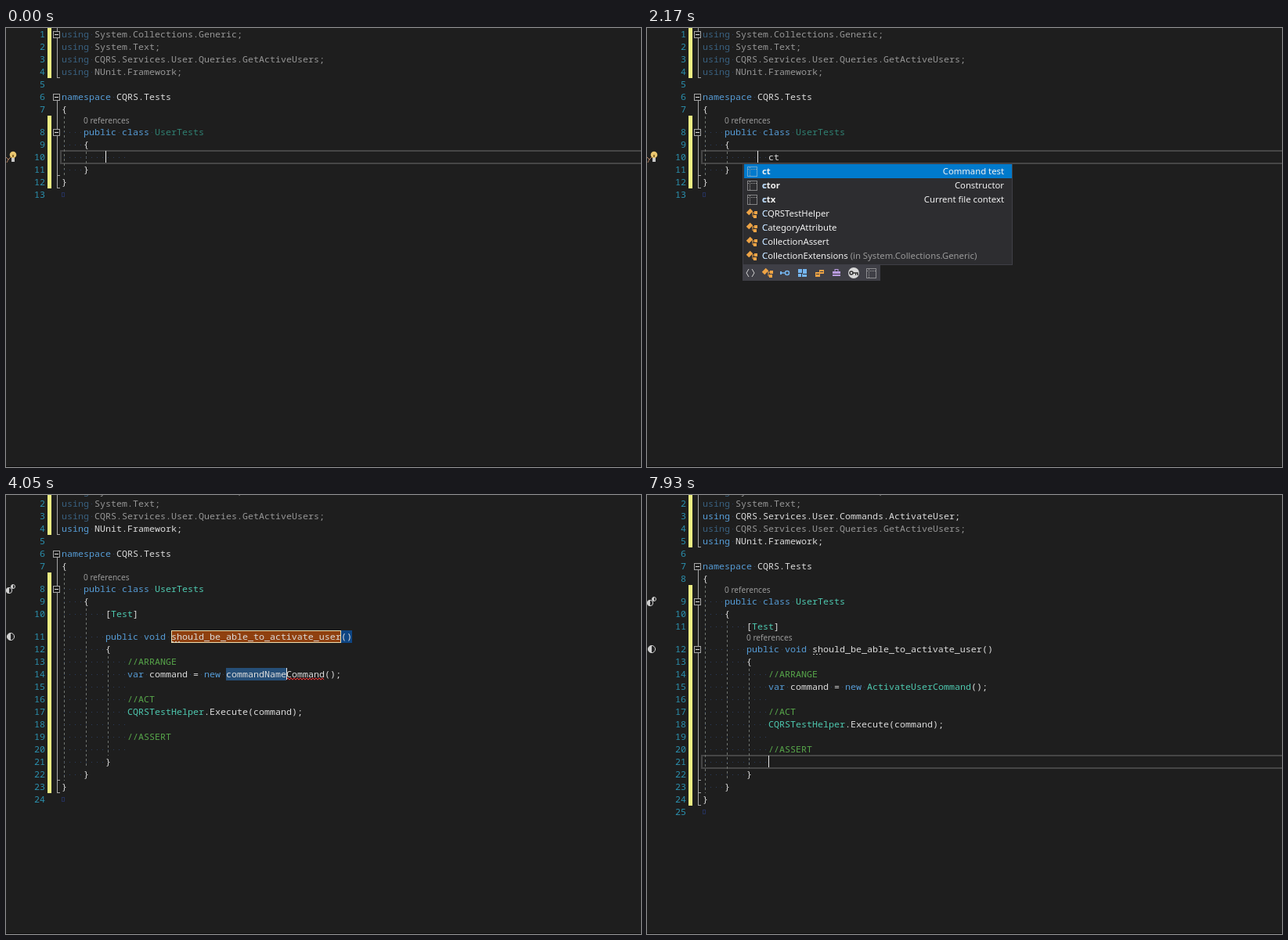
Animation of 811x561 px, one loop 8 s. Source, as an HTML page with a canvas:

```html
<!DOCTYPE html>
<html lang="en">
<head>
<meta charset="utf-8">
<title>Code editor</title>
<style>
  html, body { margin: 0; width: 100%; height: 100%; overflow: hidden; background: #1e1e1e; }
  canvas { display: block; }
</style>
</head>
<body>
<canvas id="stage" width="811" height="561"></canvas>
<script>
const ctx = document.getElementById('stage').getContext('2d');
const LOOP = 8000, LEFT = 71, CHAR = 7, LINE = 16, LENS = 13;
const CODE = '11.667px "Noto Sans Mono", monospace';
const UI = '11.3px "Noto Sans", sans-serif';
const UI_BOLD = 'bold ' + UI;
const LENS_FONT = '10.1px "Noto Sans", sans-serif';
const COLOR = {
  text: '#dcdcdc', keyword: '#569cd6', type: '#4ec9b0', comment: '#57a64a', error: '#ff3333',
  dimText: '#969696', dimKeyword: '#39607f', dimType: '#308072'
};
const KEYWORDS = ['using', 'namespace', 'public', 'class', 'void', 'var', 'new'];
const METHOD = 'should_be_able_to_activate_user';

// Moments at which the editor changes
const AT = {
  typeC: 1720, popup: 1790, typeT: 2020, filter: 2090, popupEnd: 2270, plain: 2340, expand: 2410,
  classIcon: 2570, colors: 2720, resolve: 2870, rename: 3350, renamed: 3650, methodIcon: 3880,
  nextField: 4050, braceEnd: 4200, bulb: 4580, command: 5140, unresolved: 5370,
  hint: 5520, hintBulb: 5680, imported: 6060, bound: 6680
};
const CARET_ON = [[0, 80], [630, 1090], [1640, 2340], [2410, 2950], [3350, 3880], [4050, 4580],
  [5140, 6300], [6850, 7380], [7930, 8000]];

const within = (t, from, to) => t >= from && t < to;
const colX = col => LEFT + col * CHAR;

function rect(x, y, w, h, color) {
  ctx.fillStyle = color;
  ctx.fillRect(x, y, w, h);
}
function frame(x, y, w, h, color, width = 1) {
  ctx.strokeStyle = color;
  ctx.lineWidth = width;
  ctx.strokeRect(x, y, w, h);
}
function path(points, color, width = 1) {
  ctx.beginPath();
  points.forEach(([x, y]) => ctx.lineTo(x, y));
  ctx.strokeStyle = color;
  ctx.lineWidth = width;
  ctx.stroke();
}
function disc(x, y, r, color, from = 0, to = Math.PI * 2) {
  ctx.beginPath();
  ctx.arc(x, y, r, from, to);
  ctx.fillStyle = color;
  ctx.fill();
}
function ring(x, y, r, color, width = 1) {
  ctx.beginPath();
  ctx.arc(x, y, r, 0, Math.PI * 2);
  ctx.strokeStyle = color;
  ctx.lineWidth = width;
  ctx.stroke();
}
function label(text, x, y, color, font, align = 'left') {
  ctx.font = font;
  ctx.textAlign = align;
  ctx.fillStyle = color;
  ctx.fillText(text, x, y);
}
function squiggle(x1, x2, y, color) {
  const points = [];
  for (let x = x1; x <= x2; x += 2) points.push([x, y + ((x - x1) / 2 % 2 ? -1.2 : 1.2)]);
  path(points, color);
}

function sourceLines(t) {
  const pad = '            ';
  const lines = [
    { text: 'using System.Collections.Generic;', dim: true },
    { text: 'using System.Text;', dim: true },
    { text: 'using CQRS.Services.User.Queries.GetActiveUsers;', dim: true },
    { text: 'using NUnit.Framework;', dim: t < AT.resolve },
    { text: '' }, { text: 'namespace CQRS.Tests' }, { text: '{' },
    { text: '    public class UserTests', lens: true, lensShown: true },
    { text: '    {' }
  ];
  const add = (...texts) => texts.forEach(text => lines.push({ text }));
  if (t >= AT.expand) {
    const name = t < AT.rename ? 'testName' : METHOD;
    const prefix = t < AT.command ? 'commandName' : 'ActivateUser';
    add('        [Test]');
    lines.push({ text: `        public void ${name}()`, lens: true, lensShown: t >= AT.command });
    add('        {', pad + '//ARRANGE', `${pad}var command = new ${prefix}Command();`, pad,
      pad + '//ACT', pad + 'CQRSTestHelper.Execute(command);', pad, pad + '//ASSERT', pad, '        }');
  } else {
    add(pad + (t < AT.typeC ? '' : t < AT.typeT ? 'c' : 'ct'));
  }
  add('    }', '}', '');
  if (t >= AT.imported) {
    const gray = t < AT.bound;
    lines.splice(2, 0, { text: 'using CQRS.Services.User.Commands.ActivateUser;', dim: gray, gray });
  }
  let y = t < AT.expand ? 0 : -LENS;
  for (const line of lines) {
    if (line.lens) y += LENS;
    line.top = y;
    y += LINE;
  }
  return lines;
}

function wordColors(t) {
  const colors = {
    UserTests: t < AT.resolve ? COLOR.dimType : COLOR.type,
    Test: t < AT.resolve ? COLOR.text : COLOR.type,
    CQRSTestHelper: t < AT.colors ? COLOR.text : COLOR.type,
    c: COLOR.error
  };
  if (t >= AT.unresolved) colors.ActivateUserCommand =
    t < AT.imported ? COLOR.error : t < AT.bound ? COLOR.text : COLOR.type;
  KEYWORDS.forEach(word => colors[word] = COLOR.keyword);
  return colors;
}

function drawLine(line, number, colors) {
  const { text, top, dim } = line;
  label(number, 50, top + 12, '#2b91af', CODE, 'right');
  if (line.lensShown)
    label('0 references', colX(text.search(/\S/)), top - 3, '#999999', LENS_FONT);
  for (const { 0: token, index } of text.matchAll(/ |\/\/.*|\w+|[^\w\s]+/g)) {
    const x = colX(index);
    if (token === ' ') {
      rect(x + 3, top + 8, 1, 1, '#2b3c5c');
      continue;
    }
    let color = token.startsWith('//') ? COLOR.comment : colors[token] || COLOR.text;
    if (dim) color = token === 'using' && !line.gray ? COLOR.dimKeyword : COLOR.dimText;
    label(token, x, top + 12, color, CODE);
  }
}

function foldBox(top) {
  rect(60, top + 4, 9, 9, '#1e1e1e');
  frame(60.5, top + 4.5, 8, 8, '#a5a5a5');
  rect(62, top + 8, 5, 1, '#e0e0e0');
}
function foldEnd(y) {
  rect(65, y, 4, 1, '#a5a5a5');
}

function drawOutline(t, lines, shift) {
  const top = n => lines[n - 1 + shift].top;
  const count = lines.length - shift;
  const usingEnd = top(5), classTop = top(8), end = top(count);
  rect(53, 0, 5, usingEnd, '#eff284');
  rect(53, classTop - LENS, 5, end - classTop + LENS, '#eff284');

  rect(65, 0, 1, usingEnd, '#a5a5a5');
  rect(65, top(6) + 8, 1, end - top(6) - 8, '#a5a5a5');
  [usingEnd, end - LINE, end].forEach(y => foldEnd(y - 1));
  [lines[0].top, top(6), classTop].forEach(foldBox);
  if (t >= AT.command) {
    foldBox(top(11));
    foldEnd(end - 2 * LINE - 1);
  }

  const guides = [[74, classTop - LENS, end - LINE], [102, top(10), end - 2 * LINE]];
  if (t >= AT.expand) guides.push([130, top(13), end - 3 * LINE]);
  ctx.setLineDash([3, 3]);
  for (const [x, y1, y2] of guides) path([[x + .5, y1 + 1], [x + .5, y2]], '#707570');
  ctx.setLineDash([]);
  frame(71.5, end + 5.5, 3, 5, '#25305a');
}

function bulb(x, y) {
  disc(x, y - 3, 4.3, '#e9c66f');
  rect(x - 2, y + 1, 4, 5, '#c8c8c8');
  rect(x - 1, y - 3, 2, 3, '#8a6a2a');
}
function halfCircle(x, y, r) {
  disc(x, y, r, '#252526');
  disc(x, y, r, '#d0d0d0', Math.PI / 2, Math.PI * 1.5);
  ring(x, y, r, '#d0d0d0');
}

function drawMargin(t, top) {
  if (t < AT.expand) {
    path([[0, 165], [3, 168], [6, 165]], '#b58363');
    path([[3, 168], [1, 172]], '#b58363');
    bulb(9, 165);
  }
  if (t >= AT.classIcon) {
    const y = top(8) + 8;
    halfCircle(4, y + 2, 3.7);
    halfCircle(9, y - 3, 2.5);
  }
  if (t >= AT.methodIcon) halfCircle(6, top(11) + 8, 4.6);
  if (within(t, AT.bulb, AT.command) || within(t, AT.hintBulb, AT.imported)) bulb(6, top(14) + 8);
}

function drawHighlights(t, top) {
  const border = y => frame(70, y, 760, LINE, '#464646', 2);
  if (t < AT.expand) border(top(10));
  if (within(t, AT.rename, AT.nextField)) border(top(11));
  if (within(t, AT.command, AT.imported)) border(top(14));
  if (t >= AT.imported) border(top(20));

  if (within(t, AT.expand, AT.rename)) rect(colX(20), top(11), 56, LINE, '#264f78');
  if (within(t, AT.renamed, AT.imported)) {
    rect(211, top(11), 217, LINE, '#8f400f');
    frame(211.5, top(11) + .5, 216, 15, '#ecdcae');
  }
  if (within(t, AT.renamed, AT.braceEnd)) rect(428, top(11), 14, LINE, '#0e4583');
  if (within(t, AT.nextField, AT.command)) rect(281, top(14), 77, LINE, '#264f78');
  if (within(t, AT.command, AT.imported)) frame(281.5, top(14) + .5, 84, 15, '#4b4b4b');
}

function drawMarks(t, top) {
  if (within(t, AT.popup, AT.typeT)) squiggle(134, 142, 171, COLOR.error);
  if (t >= AT.renamed)
    for (let x = 212; x < 223; x += 4) rect(x, top(11) + 14, 2, 1, '#b8b8b8');
  const y = top(14) + 14;
  if (within(t, AT.colors, AT.command)) squiggle(358, 407, y, COLOR.error);
  if (within(t, AT.command, AT.imported)) squiggle(365, 414, y, COLOR.error);
  if (within(t, AT.imported, AT.bound)) squiggle(281, 414, y, '#e8533a');
}

function drawCaret(t, top) {
  if (!CARET_ON.some(([from, to]) => within(t, from, to))) return;
  let x = 155, row = 20;
  if (t < AT.expand) [x, row] = [t < AT.typeC ? 127 : t < AT.typeT ? 134 : 141, 10];
  else if (t < AT.rename) [x, row] = [267, 11];
  else if (t < AT.nextField) [x, row] = [428, 11];
  else if (t < AT.command) [x, row] = [358, 14];
  else if (t < AT.imported) [x, row] = [365, 14];
  rect(x, top(row), 1, 15, '#e8e8e8');
}

// Completion popup icons, each centred on x, y
const ICONS = {
  angle(x, y) {
    path([[x - 2, y - 5], [x - 5, y], [x - 2, y + 5]], '#d0d0d0');
    path([[x + 2, y - 5], [x + 5, y], [x + 2, y + 5]], '#d0d0d0');
  },
  type(x, y) {
    ctx.save();
    ctx.translate(x - 3, y - 2);
    ctx.rotate(Math.PI / 4);
    rect(-2.5, -3.5, 5, 7, '#eda345');
    ctx.restore();
    path([[x, y - 1], [x + 4, y - 1]], '#eda345');
    path([[x + 1, y - 1], [x + 1, y + 4], [x + 3, y + 4]], '#eda345');
    rect(x + 3, y - 3, 4, 4, '#eda345');
    rect(x + 2, y + 2, 4, 4, '#eda345');
  },
  link(x, y) {
    ring(x + 3, y, 2.5, '#75b5ef', 1.5);
    path([[x - 6, y], [x, y]], '#75b5ef', 1.5);
    rect(x - 6, y - 2, 2, 4, '#75b5ef');
  },
  struct(x, y) {
    rect(x - 5, y - 5, 11, 10, '#75b5ef');
    rect(x, y - 5, 1, 6, '#30303a');
    rect(x - 5, y, 6, 1, '#30303a');
    rect(x + 1, y + 1, 5, 1, '#30303a');
    rect(x - 1, y + 1, 1, 4, '#30303a');
  },
  list(x, y) {
    rect(x, y - 4, 6, 5, '#eda345');
    rect(x - 5, y - 1, 6, 6, '#eda345');
    rect(x - 4, y + 1, 4, 1, '#3f3f46');
    rect(x + 1, y - 2, 4, 1, '#3f3f46');
  },
  box(x, y) {
    frame(x - 2, y - 4.5, 4, 3, '#b99be0');
    rect(x - 5, y - 2, 10, 6, '#b99be0');
    rect(x - 5, y + 1, 10, 1, '#3f3f46');
  },
  key(x, y) {
    disc(x, y, 7, '#d8d8d8');
    ring(x - 3, y, 2, '#303030', 1.5);
    path([[x - 1, y], [x + 5, y], [x + 5, y + 3]], '#303030', 1.5);
    rect(x + 2, y, 1, 3, '#303030');
  },
  template(x, y) {
    ctx.setLineDash([1, 1]);
    frame(x - 5.5, y - 5.5, 12, 12, '#d8d8d8');
    path([[x - 2.5, y - 5], [x - 2.5, y + 6]], '#a0a0a0');
    path([[x - 5, y - 2.5], [x + 6, y - 2.5]], '#a0a0a0');
    ctx.setLineDash([]);
  }
};
const COMPLETIONS = [
  ['key', 'char'], ['template', 'class'], ['key', 'const'],
  ['template', 'ca', 'Command action'], ['template', 'ct', 'Command test'],
  ['template', 'ctor', 'Constructor'], ['template', 'ctx', 'Current file context'],
  ['type', 'CQRSTestHelper'], ['type', 'CategoryAttribute'], ['type', 'CollectionAssert'],
  ['type', 'CollectionExtensions', '', '(in System.Collections.Generic)']
];

function drawPopup(t) {
  const filtered = t >= AT.filter;
  const items = filtered ? COMPLETIONS.filter(item => /^ct|^C/.test(item[1])) : COMPLETIONS;
  const height = items.length * 18 + 4, bottom = 173 + height;
  rect(122, 173, 345, height, '#3f3f46');
  rect(123, 174, 343, height - 2, '#2d2d30');
  rect(124, 174, filtered ? 342 : 335, 18, '#007acc');
  if (!filtered) {
    rect(459, 174, 7, height - 2, '#3e3e42');
    rect(459, 174, 7, 74, '#686868');
  }
  items.forEach(([icon, name, detail = '', origin = ''], i) => {
    const y = 183 + i * 18;
    const font = icon === 'type' ? UI : UI_BOLD;
    ICONS[icon](134, y);
    label(name, 147, y + 4, '#f1f1f1', font);
    if (i) label(name[0], 147, y + 4, '#a9cdf0', font);
    ctx.font = font;
    const end = 147 + ctx.measureText(name).width;
    label(origin, end + 3, y + 4, '#999999', UI);
    label(detail, 456, y + 4, '#f1f1f1', UI, 'right');
  });
  rect(122, bottom, 176, 20, '#3f3f46');
  ['angle', 'type', 'link', 'struct', 'list', 'box', 'key', 'template']
    .forEach((icon, i) => ICONS[icon](132 + i * 22, bottom + 10));
}

function drawHint() {
  rect(281, 203, 530, 18, '#424245');
  frame(281.5, 203.5, 540, 17, '#5a5a60');
  label('CQRS.Services.User.Commands.ActivateUser.ActivateUserCommand? (Alt+Enter)',
    286, 216, '#f1f1f1', CODE);
}

function draw(t) {
  const lines = sourceLines(t);
  const shift = t >= AT.imported ? 1 : 0;
  // Row numbers count without the added import
  const top = n => (lines[n - 1 + shift] || lines[0]).top;
  const colors = wordColors(t);
  rect(0, 0, 811, 561, '#1e1e1e');
  drawHighlights(t, top);
  drawOutline(t, lines, shift);
  lines.forEach((line, i) => drawLine(line, i + 1, colors));
  drawMarks(t, top);
  drawMargin(t, top);
  drawCaret(t, top);
  if (within(t, AT.popup, AT.popupEnd)) drawPopup(t);
  if (within(t, AT.hint, AT.imported)) drawHint();
  rect(0, 560, 811, 1, '#0c0c0c');
}

let start;
function tick(now) {
  start ??= now;
  draw((now - start) % LOOP);
  requestAnimationFrame(tick);
}
requestAnimationFrame(tick);
</script>
</body>
</html>
```
